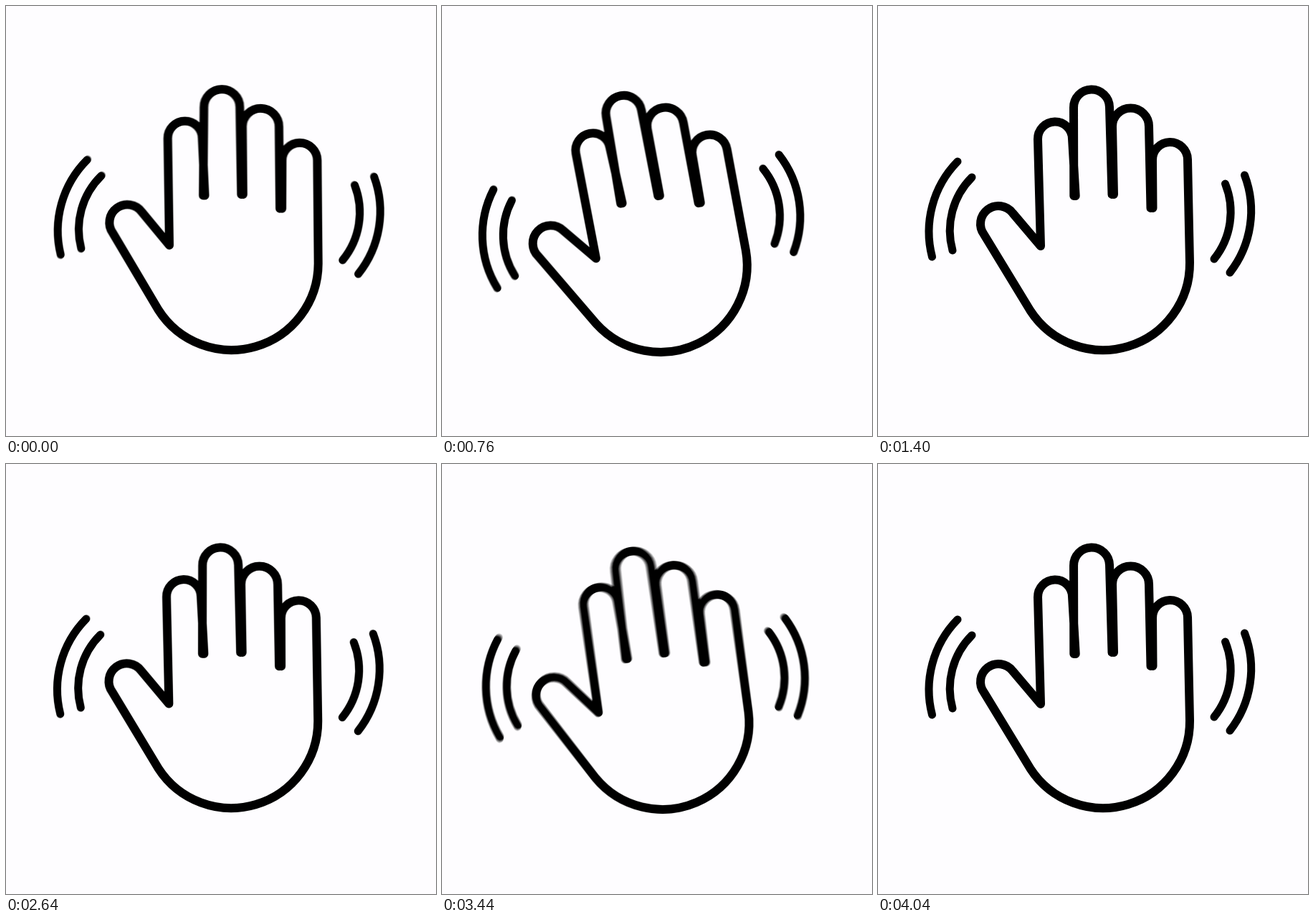
An HTML page with a canvas for the animation above (5280 ms loop, 600 by 600 pixels).

```html
<!DOCTYPE html>
<html lang="en">
<head>
<meta charset="utf-8">
<title>Waving hand</title>
<style>
  html, body { margin: 0; width: 100%; height: 100%; overflow: hidden; background: #fefdff; }
  canvas { display: block; }
</style>
</head>
<body>
<canvas id="stage" width="600" height="600"></canvas>
<script>
const LOOP = 5280, STEP = 40, SECOND_WAVE = 2649;
const SHUTTER = 8.4, SAMPLES = 9;
const PIVOT = [326.5, 417.5];

// Palm, little, ring, middle and index finger, then the thumb.
const hand = new Path2D(`
  M148 319 L212.5 425 A121 121 0 0 0 435 358
  L432 214 A24.5 24.5 0 0 0 383 215 L383.5 282
  M380.5 282 L378 168 A25.5 25.5 0 0 0 327 168 L329 263
  M326.5 263 L323 141 A25 25 0 0 0 273 142 L273.3 265
  M275.7 265 L271 185 A24 24 0 0 0 223 186
  L227 335 L188 289 A25 25 0 0 0 148 319`);

const marks = [
  { center: [105.5, 287], path: new Path2D(
    'M111 217 A140 140 0 0 0 75.5 350 M131 239 A105 105 0 0 0 104 341') },
  { center: [489, 302], path: new Path2D(
    'M511.5 236 A140 140 0 0 1 491 372 M484.5 248 A105 105 0 0 1 469 353') }
];

// Moments at which the wave starts, turns round and comes to rest.
const TURNS = [-22, 180, 374, 567, 743, 975, 1395];
const LAST = TURNS.length - 1;

const smooth = x => x * x * (3 - 2 * x);

// Swings from rest between high and low and back; a lag delays all but the end.
function swing(time, high, low, lag = 0) {
  const moment = i => TURNS[i] + (i < LAST ? lag : 0);
  const pose = i => i % LAST === 0 ? 0 : i % 2 ? high : low;
  if (time <= moment(0) || time >= moment(LAST)) return 0;
  let i = 0;
  while (time >= moment(i + 1)) i++;
  const x = (time - moment(i)) / (moment(i + 1) - moment(i));
  return (pose(i) + (pose(i + 1) - pose(i)) * smooth(x)) * Math.PI / 180;
}

const view = document.getElementById('stage').getContext('2d');
const layer = document.createElement('canvas');
layer.width = layer.height = 600;
const pen = layer.getContext('2d');
pen.lineCap = pen.lineJoin = 'round';

function turn([x, y], angle) {
  pen.translate(x, y);
  pen.rotate(angle);
  pen.translate(-x, -y);
}

function drawPose(time) {
  pen.fillStyle = '#fefdff';
  pen.fillRect(0, 0, 600, 600);
  pen.save();
  turn(PIVOT, swing(time, 20, -9.8));
  pen.lineWidth = 12;
  pen.stroke(hand);
  pen.lineWidth = 11;
  for (const { center, path } of marks) {
    pen.save();
    turn(center, swing(time, 9.6, -9.6, 50));
    pen.stroke(path);
    pen.restore();
  }
  pen.restore();
}

// Averages several poses across the shutter time for motion blur.
function render(now) {
  const time = Math.floor(now % LOOP / STEP) * STEP;
  const local = time < LOOP / 2 ? time : time - SECOND_WAVE;
  for (let i = 0; i < SAMPLES; i++) {
    drawPose(local + SHUTTER * (i / (SAMPLES - 1) - 0.5));
    view.globalAlpha = 1 / (i + 1);
    view.drawImage(layer, 0, 0);
  }
}

const start = performance.now();
function tick() {
  render(performance.now() - start);
  requestAnimationFrame(tick);
}
tick();
</script>
</body>
</html>
```
